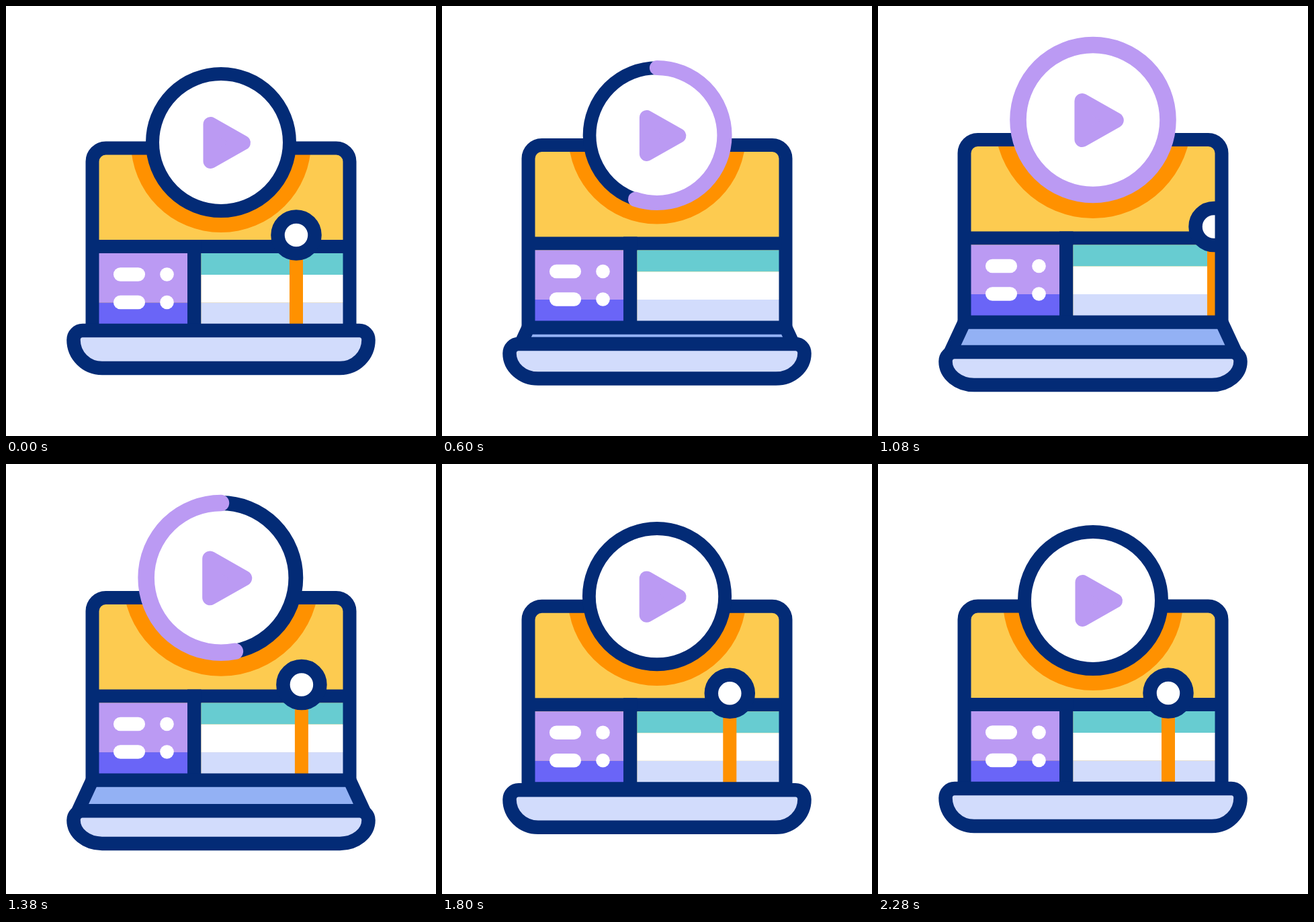
These frames come from a looping animation (640 px wide and 640 px high, 3.02 s). An HTML page with a canvas:

```html
<!DOCTYPE html>
<html lang="en">
<head>
<meta charset="utf-8">
<title>Video editing laptop</title>
<style>
html, body { margin: 0; width: 100%; height: 100%; overflow: hidden; background: #fff; }
canvas { display: block; width: 640px; height: 640px; }
</style>
</head>
<body>
<canvas width="640" height="640"></canvas>
<script>
const ctx = document.querySelector('canvas').getContext('2d');
const LOOP = 3020;
const NAVY = '#032b76', YELLOW = '#fdcb50', ORANGE = '#ff9100', PURPLE = '#bb9af3',
  BLUE = '#6a65f7', TEAL = '#67ccd1', PALE = '#d2dcfc', SKY = '#93b1f4', WHITE = '#fff';

// Poses shared by all moving parts
const times =    [220, 300, 380, 600, 740, 1080, 1290, 1660, 1820, 1980, 2280];
const tracks = {
  discY:         [203, 212, 215, 192.5, 181, 169.5, 169, 175, 200, 216, 203],
  discScale:     [1, 1, .97, .985, 1.01, 1.093, 1.095, 1.054, .985, .955, 1],
  playScale:     [1, 1, .97, .985, 1, 1.04, 1.05, 1.05, .985, .952, 1],
  screenY:       [0, 5, 6, -4.5, -8.5, -12.5, -13, -6.5, 1, 4, 0],
  baseY:         [0, -1.5, -2, 20, 26, 32, 34, 23, 1, -1, 0],
  knobX:         [432, 432, 432, 545, 560, 500, 450, 422, 429, 432, 432]
};

// Monotone cubic interpolation: no overshoot beyond the given poses
function sample(v, t) {
  const last = times.length - 1;
  if (t <= times[0]) return v[0];
  if (t >= times[last]) return v[last];
  const slope = i => (v[i + 1] - v[i]) / (times[i + 1] - times[i]);
  const tangent = i => {
    if (i === 0 || i === last) return 0;
    const a = slope(i - 1), b = slope(i);
    return a * b > 0 ? 2 * a * b / (a + b) : 0;
  };
  const i = times.findIndex(k => k > t) - 1;
  const h = times[i + 1] - times[i], u = (t - times[i]) / h, w = 1 - u;
  return v[i] * w * w * (1 + 2 * u) + v[i + 1] * u * u * (3 - 2 * u)
    + h * u * w * (tangent(i) * w - tangent(i + 1) * u);
}

function smooth(t, from, to) {
  const u = Math.min(1, Math.max(0, (t - from) / (to - from)));
  return u * u * (3 - 2 * u);
}

function paint(path, fill, stroke, width) {
  if (fill) { ctx.fillStyle = fill; ctx.fill(path); }
  if (stroke) { ctx.strokeStyle = stroke; ctx.lineWidth = width; ctx.stroke(path); }
}

function box(x1, y1, x2, y2, color) {
  ctx.fillStyle = color;
  ctx.fillRect(x1, y1, x2 - x1, y2 - y1);
}

function circle(x, y, r, fill, stroke, width) {
  const p = new Path2D();
  p.arc(x, y, r, 0, 2 * Math.PI);
  paint(p, fill, stroke, width);
}

const frame = new Path2D('M128.5 483V231.5a20 20 0 0 1 20-20H491.5a20 20 0 0 1 20 20V483Z');
const triangle = new Path2D('M-15.5-27V28L33 .5Z');

function drawKeyboard(top, bottom) {
  const shift = .465 * Math.max(0, bottom - top);
  const p = new Path2D(`M128.5 ${top}H511.5L${511.5 + shift} ${bottom}H${128.5 - shift}Z`);
  paint(p, SKY, NAVY, 20);
}

function drawScreen(s) {
  ctx.save();
  ctx.translate(0, s.screenY);
  paint(frame, YELLOW);
  ctx.save();
  ctx.beginPath();
  ctx.rect(138, 212, 364, 271);
  ctx.clip();
  circle(320, s.discY - s.screenY, 134 * s.discScale, ORANGE);
  box(138, 348, 502, 368, NAVY);
  box(138, 368, 270, 441.5, PURPLE);
  box(138, 441.5, 270, 483, BLUE);
  box(270, 348, 290.5, 483, NAVY);
  box(290.5, 368, 502, 400, TEAL);
  box(290.5, 400, 502, 441.5, WHITE);
  box(290.5, 441.5, 502, 483, PALE);
  for (const y of [399.5, 441]) {
    paint(new Path2D(`M170.2 ${y}H196.8`), null, WHITE, 20.5);
    circle(239.5, y, 10.3, WHITE);
  }
  box(s.knobX - 10, 341, s.knobX + 10, 483, ORANGE);
  circle(s.knobX, 341, 27.5, WHITE, NAVY, 20.5);
  ctx.restore();
  paint(frame, null, NAVY, 20);
  ctx.restore();
}

function drawBase(shift) {
  const top = 483 + shift, side = top + 14, bottom = 539 + .78 * shift, r = bottom - side;
  const p = new Path2D(`M114 ${top}H526A13.5 14 0 0 1 539.5 ${side}
    A42.5 ${r} 0 0 1 497 ${bottom}H143A42.5 ${r} 0 0 1 100.5 ${side}A13.5 14 0 0 1 114 ${top}Z`);
  paint(p, PALE, NAVY, 20.5);
}

function drawDisc(s, t) {
  ctx.save();
  ctx.translate(320, s.discY);
  ctx.save();
  ctx.scale(s.discScale, s.discScale);
  circle(0, 0, 102, WHITE, NAVY, 20);
  const head = smooth(t, 290, 870), tail = smooth(t, 1140, 1640);
  if (head > tail) {
    const p = new Path2D(), angle = turn => (turn * 2 - .5) * Math.PI;
    p.arc(0, 0, 102, angle(tail), angle(head));
    paint(p, null, PURPLE, 22.5);
  }
  ctx.restore();
  ctx.scale(s.playScale, s.playScale);
  paint(triangle, PURPLE, PURPLE, 22);
  ctx.restore();
}

function draw(now) {
  const t = now % LOOP, s = {};
  for (const name in tracks) s[name] = sample(tracks[name], t);
  box(0, 0, 640, 640, WHITE);
  ctx.lineJoin = ctx.lineCap = 'round';
  drawKeyboard(483 + s.screenY, 483 + s.baseY);
  drawScreen(s);
  drawBase(s.baseY);
  drawDisc(s, t);
}

let start;
function tick(now) {
  start ??= now;
  draw(now - start);
  requestAnimationFrame(tick);
}
requestAnimationFrame(tick);
</script>
</body>
</html>
```
